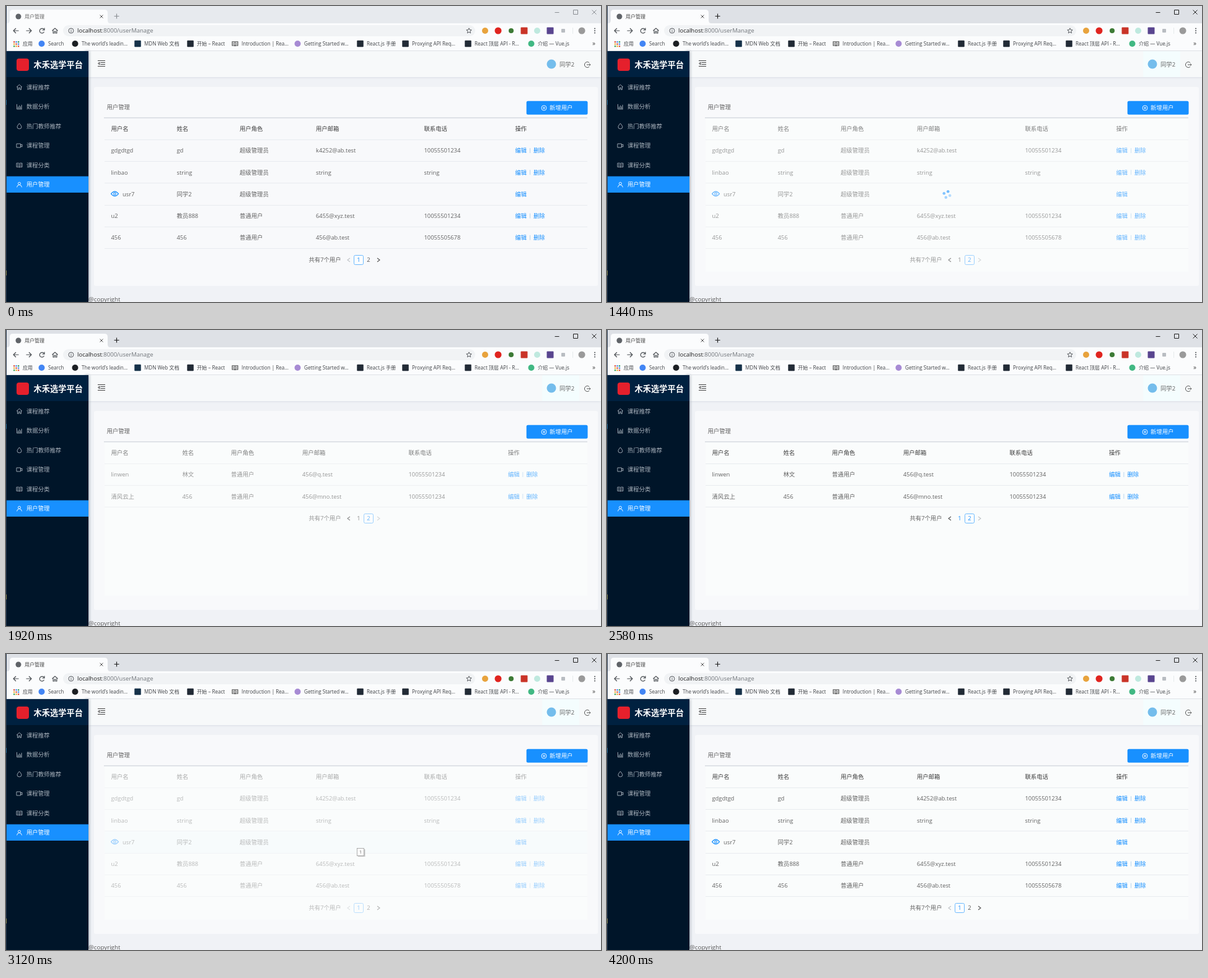
Recreate the animation shown at these times as an HTML page. Size 960 by 479 pixels, loop 5220 ms.

```html
<!DOCTYPE html>
<html lang="zh">
<head>
<meta charset="utf-8">
<title>用户管理</title>
<style>
html, body { margin: 0; width: 100%; height: 100%; overflow: hidden; background: #f0f2f6; }
svg { display: block; width: 960px; height: 479px; }
text { font-family: "Open Sans", "Noto Sans CJK SC", "Noto Sans CJK", sans-serif; white-space: pre; }
</style>
</head>
<body>
<svg id="stage" viewBox="0 0 960 479">
  <defs>
    <filter id="soft" filterUnits="userSpaceOnUse" x="0" y="0" width="960" height="479"><feGaussianBlur stdDeviation="2"/></filter>
  </defs>
  <g id="frame"></g>
  <g id="hover"></g>
  <g id="page"></g>
  <g id="table"></g>
  <g id="over"></g>
</svg>
<script>
const BLUE = '#1890ff', LOOP = 5220, TICK = 60;
const $ = id => document.getElementById(id);

// y is the vertical middle of the line
const text = (x, y, s, fill = '#626262', size = 9.35, extra = '') =>
  `<text x="${x}" y="${y + size * 0.36}" fill="${fill}" font-size="${size}" ${extra}>${s}</text>`;
const rect = (x, y, w, h, fill, r = 0, extra = '') =>
  `<rect x="${x}" y="${y}" width="${w}" height="${h}" rx="${r}" fill="${fill}" ${extra}/>`;
const dot = (x, y, r, fill, extra = '') => `<circle cx="${x}" cy="${y}" r="${r}" fill="${fill}" ${extra}/>`;
const line = (x, y, d, stroke = '#555', width = 1) =>
  `<path transform="translate(${x} ${y})" d="${d}" fill="none" stroke="${stroke}" stroke-width="${width}"/>`;
const square = (x, y, fill, s = 11) => rect(x - s / 2, y - s / 2, s, s, fill, 1);

const HOME = 'M-4.5 0 0-4 4.5 0M-3-1V4H-1V1H1V4H3V-1';
const BOOK = 'M-4.5-3.2H-1L0-2.5 1-3.2H4.5V3H1L0 3.7-1 3H-4.5ZM0-2.5V3.5M-3.2-1H-1.5M-3.2 1H-1.5M1.5-1H3.2M1.5 1H3.2';
const menuIcons = [
  HOME,
  'M-4-4V4H4.5M-2 3.5V0M0 3.5V-2M2 3.5V-.5M3.6 3.5V-3',
  'M0-4.5Q-3.5-.5-3.5 1.2A3.5 3.2 0 0 0 3.5 1.2Q3.5-.5 0-4.5Z',
  'M-4.5-3H2V3H-4.5ZM2-1 4.5-2V2L2 1',
  BOOK,
  'M-2-1.8A2 2 0 1 0 2-1.8A2 2 0 1 0-2-1.8M-4 4.3Q-3.5.4 0 .4T4 4.3'
];

function browser(focused) {
  const ink = focused ? '#222' : '#8b8f94';
  const dark = '#4b4f54';
  let s = rect(0, 0, 960, 29, focused ? '#dee1e6' : '#e7eaee');
  s += `<path d="M2 28Q6 28 6 23V11Q6 6 11 6H159Q164 6 164 11V23Q164 28 168 28Z" fill="#fbfcfd"/>`;
  s += rect(0, 28, 960, 45, '#fbfcfd') + rect(0, 72, 960, 1, '#dfe2e6');
  s += dot(20, 17, 4.5, '#5f6368') + text(30, 17, '用户管理', focused ? '#444' : '#666', 8);
  s += line(154, 17, 'M-2.5-2.5 2.5 2.5M2.5-2.5-2.5 2.5', '#555');
  s += line(178.5, 16.5, 'M-4 0H4M0-4V4', ink, 1.2);
  s += line(889, 10.5, 'M-3.5 0H3.5', ink) + line(919, 10, 'M-3.5-3.5H3.5V3.5H-3.5Z', ink);
  s += line(949, 10, 'M-3.5-3.5 3.5 3.5M3.5-3.5-3.5 3.5', ink);

  s += rect(92, 31, 665, 18, '#f1f3f5', 9);
  s += line(16, 40, 'M4.5 0H-4M0-4-4 0 0 4', dark, 1.2) + line(37, 40, 'M-4.5 0H4M0-4 4 0 0 4', dark, 1.2);
  s += line(58, 40, 'M3.5-1.5A3.8 3.8 0 1 0 3.5 1.8M4-4.5V-1H.5', dark, 1.2);
  s += line(79, 40, HOME, dark, 1.1);
  s += line(105, 40, 'M-4 0A4 4 0 1 0 4 0A4 4 0 1 0-4 0M0-.6V2.3M0-2.3V-1.4', dark, .9);
  s += text(115, 40, 'localhost<tspan fill="#70757a">:8000/userManage</tspan>', '#222', 9.5);
  s += line(747, 40, 'M0-4.2 1.2-1.4 4.2-1.2 1.9.8 2.6 3.8 0 2.2-2.6 3.8-1.9.8-4.2-1.2-1.2-1.4Z', dark, .9);
  s += dot(773, 40, 5, '#e8a33d') + dot(794, 40, 5.5, '#e0241f') + dot(815, 40, 4, '#3c7a35');
  s += square(836, 40, '#c93428') + dot(857, 40, 5, '#bfe9df') + square(878, 40, '#59458f');
  s += square(899, 40, '#b9bdc2', 6) + rect(914, 35, .8, 10, '#e3e5e8') + dot(929, 40, 5.5, '#9a9a9a');

  const gridColors = ['#e2523f', '#4a8af0', '#3da45c', '#eab136'];
  for (let i = 0; i < 9; i++)
    s += rect(12 + i % 3 * 3.5, 57 + (i / 3 | 0) * 3.5, 2.3, 2.3, gridColors[i % 4]);
  s += line(369.5, 61, BOOK, '#444', 1.1);
  const marks = [
    [27, '应用'], [68, 'Search', '#4285f4', 1], [122, 'The world’s leadin...', '#1b1f23', 1],
    [223, 'MDN Web 文档', '#16324a'], [308, '开始 – React', '#222b36'], [380, 'Introduction | Rea...'],
    [481, 'Getting Started w...', '#a78bd4', 1], [582, 'React.js 手册', '#222b36'],
    [655, 'Proxying API Req...', '#222b36'], [756, 'React 顶层 API - R...', '#222b36'], [858, '介绍 — Vue.js', '#41b883', 1]
  ];
  for (const [x, label, color, round] of marks) {
    if (color) s += round ? dot(x - 10.5, 61, 5, color) : square(x - 10.5, 61, color, 10.5);
    s += text(x, 61, label, '#404347', 8.1);
  }
  return s + text(946, 60.5, '»', '#444', 10);
}

function shell() {
  let s = rect(133, 110, 827, 5, '#b9c1cc', 0, 'filter="url(#soft)" opacity=".6"');
  s += rect(133, 73, 827, 42, '#f7f9fa');
  s += rect(128, 73, 6, 406, '#5d6b7d', 0, 'filter="url(#soft)" opacity=".6"');
  s += rect(0, 73, 133, 406, '#001529') + rect(1, 73, 132, 42, '#002140');
  s += rect(0, 0, 1, 479, '#24364d') + rect(0, 152, 1, 8, '#2c6f9b') + rect(0, 428, 1, 8, '#8f8d54');
  s += rect(17, 85, 20, 20, '#e5202c', 4) + text(44.5, 95.5, '木禾选学平台', '#fff', 13.25, 'font-weight="700"');
  ['课程推荐', '数据分析', '热门教师推荐', '课程管理', '课程分类', '用户管理'].forEach((label, i) => {
    const y = 131.3 + i * 31.55, on = i == 5;
    if (on) s += rect(1, 275.6, 132, 26.4, BLUE);
    s += line(21.5, y, menuIcons[i], on ? '#fff' : '#a9b2bc', .9) + text(33, y, label, on ? '#fff' : '#a9b2bc');
  });
  return s + line(154, 93, 'M-6-4.5H6M-1.5-1.5H6M-1.5 1.5H6M-6 4.5H6M-3-2-5.5 0-3 2Z', '#444', 1);
}

function card() {
  let s = dot(880, 94, 7.5, '#74bdec') + text(893, 95, '同学2');
  s += line(938, 95, 'M3-3.3A4.5 4.5 0 1 0 3 3.3M-1 0H5M3.3-1.7 5 0 3.3 1.7', '#555', 1);
  s += rect(142, 131, 813, 322, '#f8f9fb', 3);
  s += text(162.5, 164, '用户管理') + rect(839.7, 153.7, 98.8, 22, BLUE, 2.5);
  s += line(868, 165, 'M-4 0A4 4 0 1 0 4 0A4 4 0 1 0-4 0M-2 0H2M0-2V2', '#fff', .9) + text(877, 165, '新增用户', '#fff');
  return s + text(133, 474, '@copyright', '#595959', 9.8);
}

const ADMIN = '超级管理员', USER = '普通用户', TEL = '10055501234';
const pages = {
  1: {
    cols: [169.5, 275.5, 377, 500, 674.5, 821.5],
    rows: [
      ['gdgdtgd', 'gd', ADMIN, 'k4252@ab.test', TEL],
      ['linbao', 'string', ADMIN, 'string', 'string'],
      ['usr7', '同学2', ADMIN, '', ''],
      ['u2', '教员888', USER, '6455@xyz.test', TEL],
      ['456', '456', USER, '456@ab.test', '10055505678']
    ]
  },
  2: {
    cols: [169.5, 284.5, 363, 478, 649.5, 810],
    rows: [
      ['linwen', '林文', USER, '456@q.test', TEL],
      ['清风云上', '456', USER, '456@mno.test', TEL]
    ]
  }
};

function pager(y, current, hot) {
  let s = text(488.5, y, '共有7个用户');
  s += line(553, y, 'M2-3-2 0 2 3', current == 1 ? '#c0c4c8' : '#555', 1.1);
  s += line(601, y, 'M-2-3 2 0-2 3', current == 2 ? '#c0c4c8' : '#555', 1.1);
  s += rect(current == 1 ? 561.5 : 577.5, y - 7.5, 15, 15, '#fcfdfe', 2, 'stroke="#5cb3ff" stroke-width=".9"');
  for (const n of [1, 2])
    s += text(n == 1 ? 569 : 585, y, n, n == current || n == hot ? BLUE : '#555', 9.35, 'text-anchor="middle"');
  return s;
}

function table(page, current, hot, rowTint) {
  const { cols, rows } = pages[page];
  let s = '';
  ['用户名', '姓名', '用户角色', '用户邮箱', '联系电话', '操作'].forEach((h, i) => s += text(cols[i], 199, h, '#3c3c3c'));
  s += rect(159, 216, 779, 1, '#e8ebef');
  rows.forEach((row, i) => {
    const y = 234 + i * 35.2, self = row[0] == 'usr7', x = cols[5];
    if (self) {
      s += rect(159, y - 17, 779, 34.5, '#e9f5fd', 0, `opacity="${rowTint}"`);
      s += line(175.5, y - .5, 'M-6 0Q0-7.5 6 0Q0 7.5-6 0ZM-1.8 0A1.8 1.8 0 1 0 1.8 0A1.8 1.8 0 1 0-1.8 0', BLUE, 1.1);
    }
    row.forEach((cell, c) => s += text(self && !c ? 188 : cols[c], y, cell));
    s += text(x, y, '编辑', BLUE);
    if (!self) s += rect(x + 23.5, y - 4, .8, 8, '#a9cdea') + text(x + 29.5, y, '删除', BLUE);
    s += rect(159, Math.round(y + 17.2), 779, 1, '#e8ebef');
  });
  return s + pager(page == 1 ? 411 : 305, current, hot);
}

function spinner(y, t) {
  let s = '';
  for (let i = 0; i < 4; i++) {
    const a = (i * 90 + 20 + (t - 1440) / 1200 * 405) * Math.PI / 180;
    const o = 0.45 + 0.15 * Math.sin(t / 300 + i);
    s += dot(548.5 + 5 * Math.cos(a), y + 5 * Math.sin(a), 2.3, BLUE, `opacity="${o}"`);
  }
  return s;
}

// linear interpolation through [time, value] pairs
function track(t, keys) {
  if (t <= keys[0][0]) return keys[0][1];
  for (let i = 1; i < keys.length; i++) {
    const [a, u] = keys[i - 1], [b, v] = keys[i];
    if (t < b) return u + (v - u) * (t - a) / (b - a);
  }
  return keys[keys.length - 1][1];
}

const fade = [[1380, 1], [1440, .65], [1620, .35], [1760, .35], [2100, 1],
  [2760, 1], [2820, .65], [2940, .35], [3090, .35], [3360, 1]];

function draw(t) {
  const page = t >= 1800 && t < 3060 ? 2 : 1;
  const current = t >= 1440 && t < 2820 ? 2 : 1;
  const hot = t >= 960 && t < 1440 ? 2 : t >= 2580 && t < 2820 ? 1 : 0;

  $('frame').innerHTML = browser(t >= 1260) + shell();
  let s = rect(865, 73, 60, 42, '#f4fdfe', 0, `opacity="${track(t, [[180, 0], [480, 1]])}"`);
  for (const dy of [-3.5, 0, 3.5]) s += dot(950, 40 + dy, 1, '#4b4f54');
  $('hover').innerHTML = s;

  const back = t >= 1440 ? rect(159, 181, 779, 249, '#fafcfc') : '';
  $('page').innerHTML = card() + back + rect(158, 180.2, 780, 1.4, '#d5d9df');
  $('table').innerHTML = table(page, current, hot, track(t, [[3060, 0], [3120, .4], [3720, .4], [4140, 0]]));
  $('table').setAttribute('opacity', track(t, fade));

  s = '';
  if (page != current) s = spinner(page == 1 ? 305 : 252.5, t);
  if (t >= 3000 && t < 3300) {
    s += rect(568, 316, 11.5, 12, '#aaa', 0, 'opacity=".6"');
    s += rect(566.5, 314.5, 11, 12, '#fff', 0, 'stroke="#999" stroke-width=".8"');
    s += text(572, 320.5, '1', '#666', 8, 'text-anchor="middle"');
  }
  $('over').innerHTML = s;
}

let last = -1;
function loop(now) {
  const t = Math.floor(now % LOOP / TICK) * TICK;
  if (t != last) draw(last = t);
  requestAnimationFrame(loop);
}
draw(0);
requestAnimationFrame(loop);
</script>
</body>
</html>
```
